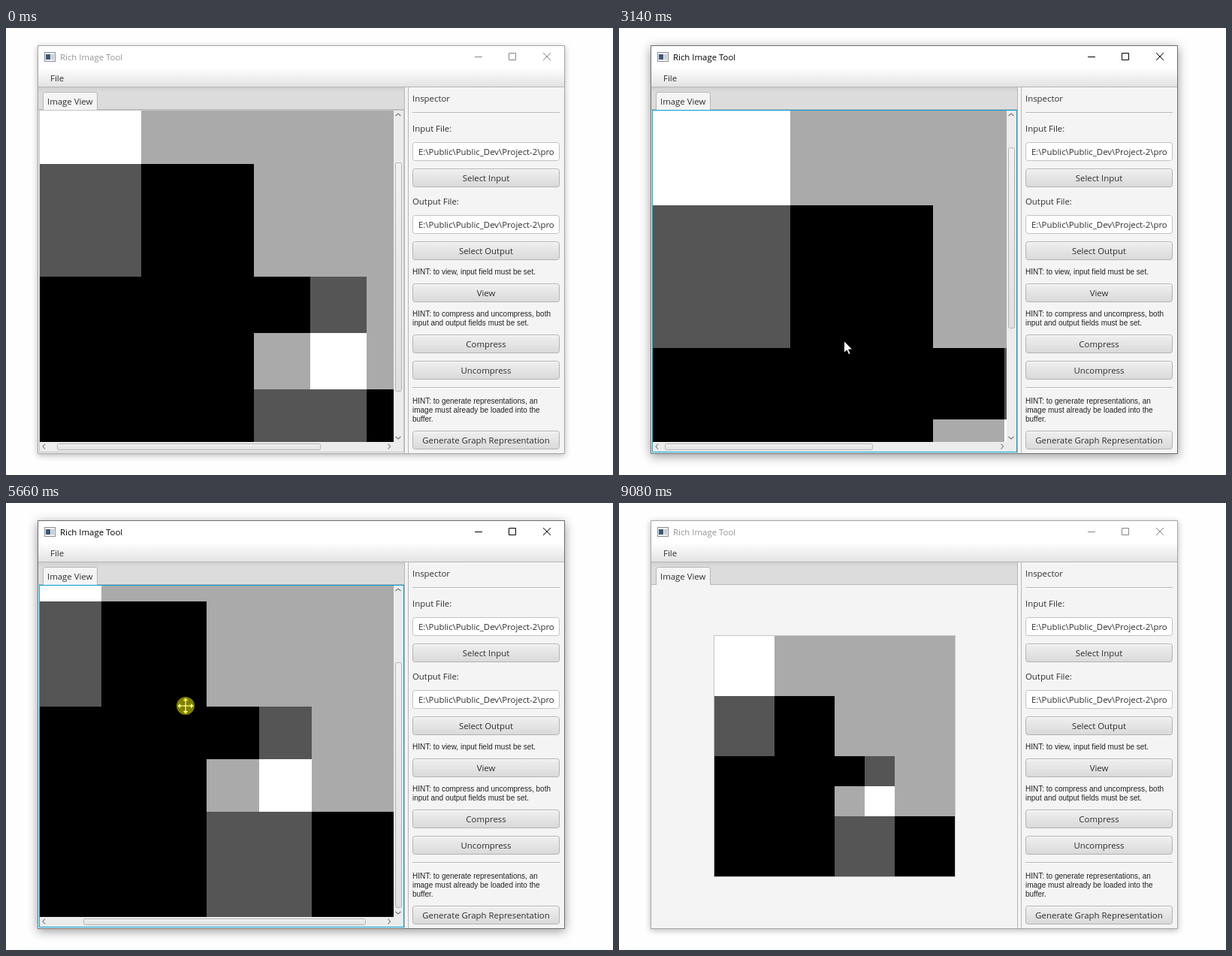
Write an HTML page that moves like this. It is 808x595 px and loops after 9.16 s.

```html
<!DOCTYPE html>
<html lang="en">
<head>
<meta charset="utf-8">
<title>Rich Image Tool</title>
<style>
  html, body { margin: 0; width: 100%; height: 100%; overflow: hidden; background: #fefefe; }
  #shadow { position: absolute; left: 42px; top: 23px; width: 702px; height: 544px;
    box-shadow: 0 2px 8px rgba(0,0,0,.28); }
  #shadow.active { box-shadow: 0 3px 13px rgba(0,0,0,.4); }
  svg { position: absolute; left: 0; top: 0; display: block; }
  text { font: 11.4px "Open Sans", "Noto Sans", sans-serif; fill: #2e2e2e; }
  .hint { font: 10px "Liberation Sans", Arial, sans-serif; fill: #222; }
  .mid { text-anchor: middle; }
  .line { fill: none; stroke: #b6b6b6; }
  #title { fill: #949494; }
  #controls { fill: none; stroke: #858585; }
  #frame { fill: none; stroke: #a6a6a6; }
  #ring { fill: none; stroke: #c4c4c4; }
  .active #title { fill: #000; }
  .active #controls { stroke: #000; }
  .active #frame { stroke: #6e6e6e; }
  .active #ring { stroke: #039ed3; }
  .chevron { fill: none; stroke: #777; stroke-width: 1.1; }
  .thumb { fill: url(#thumbFill); stroke: #b4b4b4; }
</style>
</head>
<body>
<div id="shadow"></div>
<svg id="stage" width="808" height="595" viewBox="0 0 808 595">
  <defs>
    <linearGradient id="menuFill" x2="0" y2="1"><stop stop-color="#fdfdfd"/><stop offset="1" stop-color="#e3e3e3"/></linearGradient>
    <linearGradient id="buttonFill" x2="0" y2="1"><stop stop-color="#f0f0f0"/><stop offset="1" stop-color="#d9d9d9"/></linearGradient>
    <linearGradient id="tabsFill" x2="0" y2="1"><stop stop-color="#cfcfcf"/><stop offset=".2" stop-color="#dcdcdc"/><stop offset="1" stop-color="#dcdcdc"/></linearGradient>
    <linearGradient id="thumbFill" x2="0" y2="1"><stop stop-color="#f1f1f1"/><stop offset="1" stop-color="#e0e0e0"/></linearGradient>
    <clipPath id="clip"><rect id="clipBox"/></clipPath>
  </defs>

  <rect x="43" y="24" width="700" height="542" fill="#f4f4f4"/>
  <rect x="43" y="24" width="700" height="30" fill="#fff"/>
  <rect x="43" y="54" width="700" height="24" fill="url(#menuFill)"/>
  <path class="line" d="M43 78.5H743"/>
  <g shape-rendering="crispEdges">
    <rect x="51.5" y="32.5" width="14" height="12" fill="#f2f2f2" stroke="#8b8f94"/>
    <rect x="53" y="35" width="6" height="7" fill="#3c5878"/>
    <rect x="60" y="35" width="4" height="7" fill="#c9ced3"/>
  </g>
  <text id="title" x="72" y="43">Rich Image Tool</text>
  <path id="controls" d="M624 38.5h10M669.5 33.5h9v9h-9zM715 33l10 10M725 33l-10 10"/>
  <text x="59" y="71">File</text>

  <rect x="43" y="79" width="487" height="30" fill="url(#tabsFill)"/>
  <path class="line" d="M43 108.5H530"/>
  <path d="M49.5 109V88.500q0-3 3-3h66q3 0 3 3V109" fill="#f4f4f4" stroke="#b6b6b6"/>
  <text x="55" y="102">Image View</text>
  <path class="line" d="M530.5 79V566M535.5 79V566"/>

  <g id="inspector"></g>

  <g clip-path="url(#clip)"><g id="picture" shape-rendering="crispEdges"></g></g>
  <g id="bars">
    <path d="M516 110h13v454h-484v-13h471z" fill="#ececec"/>
    <path class="chevron" d="M518.500 117l3.500-3 3.500 3M518.500 544l3.500 3 3.500-3M52 553.500l-3 3.500 3 3.500M508.500 553.500l3 3.500-3 3.500"/>
    <rect id="thumbX" class="thumb" y="553.500" height="8" rx="2"/>
    <rect id="thumbY" class="thumb" x="518.500" width="8" rx="2"/>
  </g>
  <rect id="ring"/>
  <rect id="frame" x="42.500" y="23.500" width="701" height="543"/>

  <g id="cursor">
    <path id="arrow" d="M.5 .5V16.500L4.200 13L6.800 18.700L9.200 17.600L6.700 12H11.800Z" fill="#fff" stroke="#000"/>
    <g id="grab">
      <path d="M0-11l4 4.500h-3v5.500h5.500v-3l4.500 4-4.500 4v-3h-5.500v5.500h3l-4 4.500-4-4.500h3v-5.500h-5.500v3l-4.500-4 4.500-4v3h5.500v-5.500h-3z" fill="#fff" stroke="#000" stroke-width=".8"/>
      <circle r="12" fill="#ff0" opacity=".5"/>
    </g>
  </g>
</svg>
<script>
const $ = id => document.getElementById(id);
const LOOP = 9160, STEP = 80;
const FOCUS = [1240, 9080];
const VIEW = { x: 45, y: 110, w: 471, h: 441 };
const clamp = (v, lo, hi) => Math.min(hi, Math.max(lo, v));
const set = (el, attrs) => { for (const k in attrs) el.setAttribute(k, attrs[k]); };

// Inspector panel
const label = (y, s) => `<text x="541" y="${y}">${s}</text>`;
const hint = (y, ...lines) => lines.map((s, i) => `<text class="hint" x="541" y="${y + 12 * i}">${s}</text>`).join('');
const rule = y => `<path class="line" d="M541 ${y}.5H737"/><path d="M541 ${y + 1}.5H737" stroke="#fff"/>`;
const button = (y, s) => `<rect x="541.5" y="${y}.5" width="195" height="24" rx="3" fill="url(#buttonFill)" stroke="#b3b3b3"/>
  <path d="M544 ${y + 1}.5H734" stroke="#fafafa"/><text class="mid" x="639" y="${y + 17}">${s}</text>`;
const field = y => `<rect x="541.5" y="${y}.5" width="195" height="24" rx="3" fill="#fff" stroke="#c2c2c2"/>
  <text x="549" y="${y + 17}">E:\\Public\\Public_Dev\\Project-2\\pro</text>`;
$('inspector').innerHTML = [
  label(98, 'Inspector'), rule(112),
  label(138, 'Input File:'), field(152), button(187, 'Select Input'),
  label(235, 'Output File:'), field(249), button(284, 'Select Output'),
  hint(328, 'HINT: to view, input field must be set.'), button(340, 'View'),
  hint(384, 'HINT: to compress and uncompress, both', 'input and output fields must be set.'),
  button(408, 'Compress'), button(443, 'Uncompress'), rule(478),
  hint(500, 'HINT: to generate representations, an', 'image must already be loaded into the', 'buffer.'),
  button(536, 'Generate Graph Representation')
].join('');

// Quadtree picture on an 8 x 8 grid: x, y, size, colour
$('picture').innerHTML = [
  [0, 0, 8, '#aaa'], [0, 0, 2, '#fff'], [0, 2, 2, '#555'], [2, 2, 2, '#000'],
  [0, 4, 4, '#000'], [4, 4, 1, '#000'], [5, 4, 1, '#555'], [5, 5, 1, '#fff'],
  [4, 6, 2, '#555'], [6, 6, 2, '#000']
].map(([x, y, s, c]) => `<rect x="${x}" y="${y}" width="${s}" height="${s}" fill="${c}"/>`).join('');

// Spans in which the screen refreshes every STEP ms
const spans = [[0, 0], [290, 530], [840, 1000], [1160, 1720], [1870, 2670], [2820, 3140], [3440, 3920],
  [4150, 4310], [4860, 5020], [5260, 7580], [7820, 8140], [8450, 8850], [9080, 9080]];

// Cell size in px; a run zooms by one notch per step
const zoom = [[0, 75], [840, 80], [920, 90], [1000, 95],
  ...Array.from({ length: 7 }, (_, i) => [3440 + i * STEP, 90 - 5 * i]),
  [4150, 55], [4230, 50], [4310, 45], [4860, 50], [4940, 60], [5020, 70],
  [7820, 65], [7900, 60], [7980, 50], [8060, 45], [8140, 40]];

// Pointer path: time, x, y
const path = [[290, 497, 544], [370, 415, 465], [450, 335, 398], [530, 293, 372],
  [1080, 293, 372], [1240, 272, 321], [1720, 300, 380], [1790, 300, 380], [2030, 396, 416],
  [2350, 260, 310], [2670, 225, 360], [2740, 225, 360], [3140, 299, 415.4], [3360, 299, 415.4],
  [3920, 304, 411], [5180, 304, 411], [5340, 295, 388], [5660, 239, 270], [5900, 222, 235],
  [6140, 270, 240], [6460, 350, 280], [6780, 345, 343], [7100, 275, 390], [7580, 245, 386],
  [8370, 245, 386], [8450, 290, 400], [8610, 500, 478], [8770, 725, 574]];

const drags = [[1240, 3140], [5340, 7580]];

function refreshTime(t) {
  const [start, end] = spans.filter(s => s[0] <= t).pop();
  return Math.min(end, start + Math.floor((t - start) / STEP) * STEP);
}
const cellAt = t => zoom.filter(z => z[0] <= t).pop()[1];

function pointerAt(t) {
  const i = path.findIndex(p => p[0] > t);
  if (i < 0) return path[path.length - 1].slice(1);
  if (i === 0) return path[0].slice(1);
  const a = path[i - 1], b = path[i], f = (t - a[0]) / (b[0] - a[0]);
  return [1, 2].map(k => a[k] + (b[k] - a[k]) * f);
}

// Scroll position as a fraction of its range, kept across zooming
function scrollAt(t) {
  let pos = [.117, .496];
  for (const [start, end] of drags) {
    if (t < start) break;
    const from = pointerAt(start), to = pointerAt(Math.min(t, end)), size = 8 * cellAt(start);
    const range = [size - VIEW.w, size - VIEW.h];
    pos = pos.map((p, k) => clamp(p - (to[k] - from[k]) / range[k], 0, 1));
  }
  return pos;
}

function draw(now) {
  const t = refreshTime(now), cell = cellAt(t), size = 8 * cell;
  const active = t >= FOCUS[0] && t < FOCUS[1];
  $('stage').classList.toggle('active', active);
  $('shadow').classList.toggle('active', active);

  const fits = size + 2 <= 455;
  let x = 287 - size / 2, y = 337 - size / 2;
  $('bars').style.display = fits ? 'none' : '';
  if (fits) {
    set($('clipBox'), { x, y, width: size, height: size });
    set($('ring'), { x: x - .5, y: y - .5, width: size + 1, height: size + 1 });
  } else {
    const [h, v] = scrollAt(t), sx = h * (size - VIEW.w), sy = v * (size - VIEW.h);
    x = Math.round(VIEW.x - sx);
    y = Math.round(VIEW.y - sy);
    set($('clipBox'), { x: VIEW.x, y: VIEW.y, width: VIEW.w, height: VIEW.h });
    set($('ring'), { x: 44.5, y: 109.5, width: 485, height: 455 });
    const kx = 447 / size, ky = 415 / size;
    set($('thumbX'), { x: Math.round(57 + sx * kx) + .5, width: Math.round(VIEW.w * kx) - 1 });
    set($('thumbY'), { y: Math.round(124 + sy * ky) + .5, height: Math.round(VIEW.h * ky) - 1 });
  }
  set($('picture'), { transform: `translate(${x} ${y}) scale(${cell})` });

  const dragging = drags.some(([a, b]) => t >= a && t < b);
  $('cursor').style.display = t >= 290 && t < 8850 ? '' : 'none';
  $('arrow').style.display = dragging ? 'none' : '';
  $('grab').style.display = dragging ? '' : 'none';
  const [px, py] = pointerAt(t).map(p => Math.round(p + .2));
  set($('cursor'), { transform: `translate(${px} ${py})` });
}

const begin = performance.now();
function tick() {
  draw((performance.now() - begin) % LOOP);
  requestAnimationFrame(tick);
}
tick();
</script>
</body>
</html>
```
